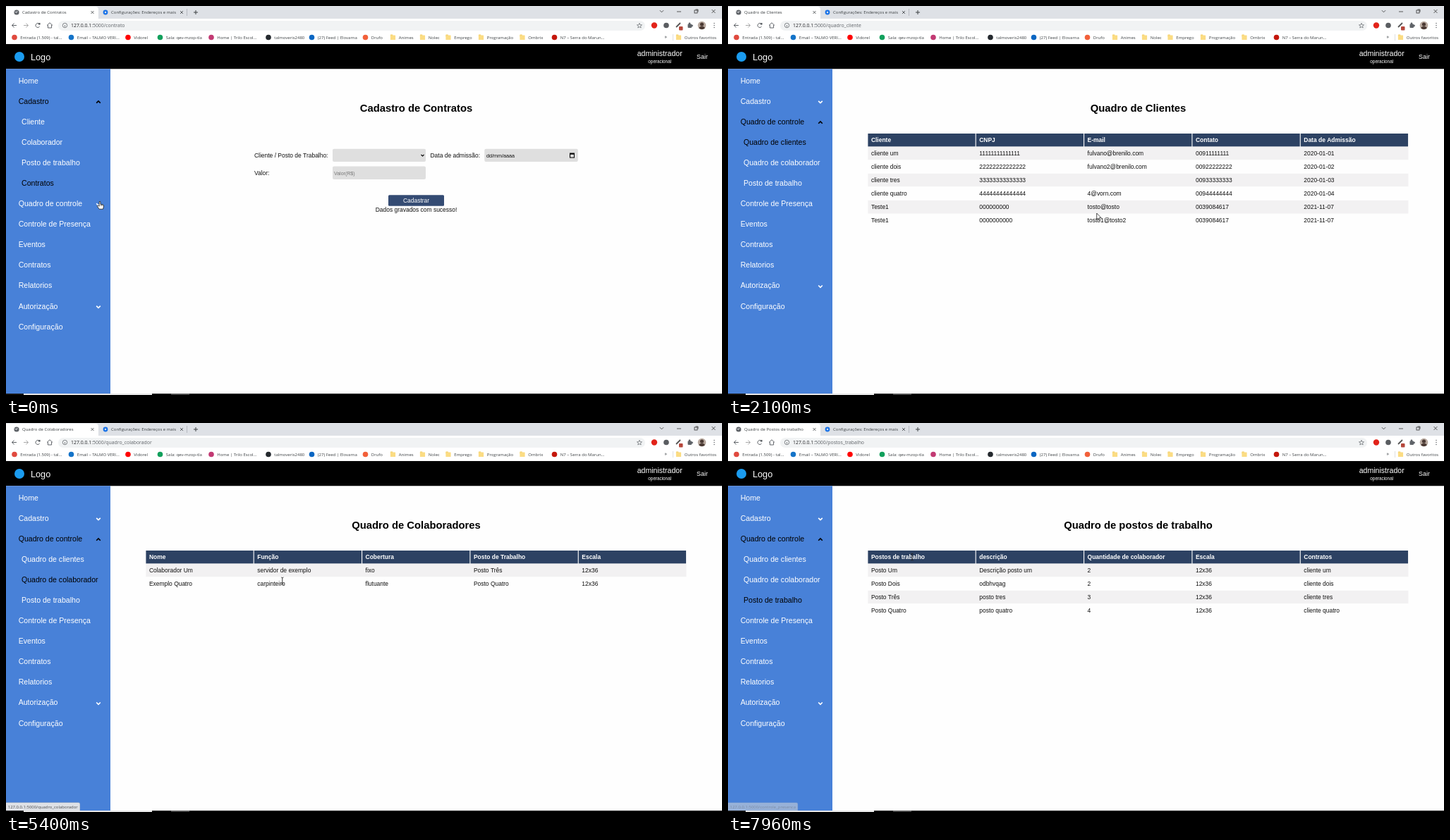
Recreate the animation shown at these times as an HTML page with a canvas. Size 1015x552 px, loop 8000 ms.

```html
<!DOCTYPE html>
<html lang="pt-BR">
<head>
<meta charset="utf-8">
<title>Painel</title>
<style>
html, body { margin: 0; width: 100%; height: 100%; overflow: hidden; background: #fff; }
canvas { display: block; width: 1015px; height: 552px; }
</style>
</head>
<body>
<canvas id="stage" width="1015" height="552"></canvas>
<script>
const ctx = document.getElementById('stage').getContext('2d');
const LOOP = 8000;
const PAGE = '"Liberation Sans", Arial, sans-serif';
const UI = '"Open Sans", sans-serif';
const HOST = '127.0.0.1';
const BODY = 8.46;

const MENU = [
  ['Home'],
  ['Cadastro', ['Cliente', 'Colaborador', 'Posto de trabalho', 'Contratos']],
  ['Quadro de controle', ['Quadro de clientes', 'Quadro de colaborador', 'Posto de trabalho']],
  ['Controle de Presença'], ['Eventos'], ['Contratos'], ['Relatorios'],
  ['Autorização', []], ['Configuração']
];

const PAGES = {
  contract: { title: 'Cadastro de Contratos', tab: 'Cadastro de Contratos', path: 'contrato', active: 'Contratos' },
  clients: {
    title: 'Quadro de Clientes', tab: 'Quadro de Clientes', path: 'quadro_cliente', active: 'Quadro de clientes',
    rows: [
      'Cliente|CNPJ|E-mail|Contato|Data de Admissão',
      'cliente um|11111111111111|fulvano@brenilo.com|00911111111|2020-01-01',
      'cliente dois|22222222222222|fulvano2@brenilo.com|00922222222|2020-01-02',
      'cliente tres|33333333333333||00933333333|2020-01-03',
      'cliente quatro|44444444444444|4@vorn.com|00944444444|2020-01-04',
      'Teste1|000000000|tosto@tosto|0039084617|2021-11-07',
      'Teste1|0000000000|tosto1@tosto2|0039084617|2021-11-07'
    ]
  },
  staff: {
    title: 'Quadro de Colaboradores', tab: 'Quadro de Colaboradores', path: 'quadro_colaborador', active: 'Quadro de colaborador',
    rows: [
      'Nome|Função|Cobertura|Posto de Trabalho|Escala',
      'Colaborador Um|servidor de exemplo|fixo|Posto Três|12x36',
      'Exemplo Quatro|carpinteiro|flutuante|Posto Quatro|12x36'
    ]
  },
  posts: {
    title: 'Quadro de postos de trabalho', tab: 'Quadro de Postos de trabalho', path: 'postos_trabalho', active: 'Posto de trabalho',
    rows: [
      'Postos de trabalho|descrição|Quantidade de colaborador|Escala|Contratos',
      'Posto Um|Descrição posto um|2|12x36|cliente um',
      'Posto Dois|odbhvqag|2|12x36|cliente dois',
      'Posto Três|posto tres|3|12x36|cliente tres',
      'Posto Quatro|posto quatro|4|12x36|cliente quatro'
    ]
  }
};

// Step tracks: the last entry whose time has passed applies.
const PAGE_TRACK = [[0, 'contract'], [810, 'clients'], [4900, 'staff'], [7470, 'posts']];
const PATH_TRACK = [[0, 'contrato'], [700, 'quadro_cliente'], [4860, 'quadro_colaborador'], [7430, 'postos_trabalho']];
const HOVER_TRACK = [
  [0, ''], [440, 'Quadro de clientes'], [810, 'Eventos'], [1080, ''], [3700, 'Controle de Presença'],
  [3900, 'Posto de trabalho'], [4120, 'Quadro de colaborador'], [4200, 'Quadro de clientes'],
  [4380, 'Quadro de colaborador'], [5260, ''], [6640, 'Posto de trabalho'], [7770, 'Controle de Presença'], [7830, '']
];
const CURSOR_TRACK = [
  [0, 'hand'], [700, 'arrow'], [810, 'hand'], [1080, 'arrow'], [3400, 'hand'], [5260, 'arrow'],
  [5370, 'beam'], [5440, 'arrow'], [6640, 'hand'], [7820, 'arrow'], [7930, 'beam']
];
const CURSOR_PATH = [
  [0, 133, 277], [100, 133, 277], [560, 77, 314], [900, 77, 314], [1500, 343, 312], [1530, 345, 312],
  [2100, 522, 294], [2330, 681, 298], [2360, 684, 299], [2460, 755, 314], [2660, 755, 314],
  [2830, 469, 334], [3200, 469, 334], [3500, 117, 316], [4000, 80, 238], [4250, 75, 197],
  [4530, 70, 218], [5200, 70, 218], [5400, 391, 224], [6000, 857, 228], [6030, 857, 228],
  [6760, 65, 254], [7700, 65, 254], [7800, 120, 276], [7880, 300, 230], [7960, 261, 190]
];
// Status bubble: start, end, fade-in, fade-out, path
const STATUS = [
  [500, 740, 60, 1, 'quadro_cliente'], [740, 1340, 1, 120, 'evento'],
  [4300, 5640, 80, 120, 'quadro_colaborador'], [6850, 7790, 45, 1, 'postos_trabalho'],
  [7790, 8000, 1, 60, 'controle_presenca']
];

const at = (track, t) => track.filter(k => k[0] <= t).pop()[1];

function cursorAt(t) {
  const i = CURSOR_PATH.findIndex(k => k[0] > t);
  if (i < 0) return CURSOR_PATH.at(-1).slice(1);
  const [t0, x0, y0] = CURSOR_PATH[i - 1], [t1, x1, y1] = CURSOR_PATH[i];
  const p = (t - t0) / (t1 - t0);
  return [x0 + (x1 - x0) * p, y0 + (y1 - y0) * p];
}

function box(x, y, w, h, color, r = 0) {
  ctx.fillStyle = color;
  ctx.beginPath();
  ctx.roundRect(x, y, w, h, r);
  ctx.fill();
}

function dot(x, y, r, color) {
  ctx.fillStyle = color;
  ctx.beginPath();
  ctx.arc(x, y, r, 0, 7);
  ctx.fill();
}

function line(points, color, width = 0.8) {
  ctx.strokeStyle = color;
  ctx.lineWidth = width;
  ctx.beginPath();
  points.forEach(([x, y]) => ctx.lineTo(x, y));
  ctx.stroke();
}

function ring(x, y, r, color, from = 0, to = 7, width = 0.8) {
  ctx.strokeStyle = color;
  ctx.lineWidth = width;
  ctx.beginPath();
  ctx.arc(x, y, r, from, to);
  ctx.stroke();
}

function cross(x, y, r, color, width) {
  line([[x - r, y - r], [x + r, y + r]], color, width);
  line([[x - r, y + r], [x + r, y - r]], color, width);
}

function chevron(x, y, w, h, color, width) {
  line([[x - w, y - h], [x, y + h], [x + w, y - h]], color, width);
}

function label(str, x, cy, size, color, { font = PAGE, weight = 400, align = 'left' } = {}) {
  ctx.font = `${weight} ${size}px ${font}`;
  ctx.textAlign = align;
  ctx.fillStyle = color;
  ctx.fillText(str, x, cy + size * 0.355);
  return ctx.measureText(str).width;
}

const ui = (str, x, y, color = '#3c4043', size = 6) => label(str, x, y, size, color, { font: UI });

function drawTabs(page, path, loading, t) {
  box(0, 0, 1015, 18, '#dee1e6');
  box(0, 1, 131, 18, '#fff', [0, 4, 0, 0]);
  if (loading) {
    const a = t / 160;
    ring(15, 9, 3.4, '#f3cfa8', a, a + 1.6);
  } else {
    dot(15, 9, 3.6, '#5f6368');
    line([[12.5, 8], [15, 9.5], [16, 7]], '#dfe1e5', 1);
  }
  ui(loading ? `${HOST}:5000/${path}` : page.tab, 23, 9);
  cross(122.5, 9, 2, '#3c4043');
  dot(141, 9, 3.4, '#1a73e8');
  dot(141, 9, 1.2, '#dee1e6');
  ui('Configurações: Endereços e mais', 149, 9);
  cross(249, 9, 2, '#3c4043');
  line([[256.5, 4], [256.5, 14]], '#9aa0a6', 0.6);
  line([[266, 9], [272, 9]], '#3c4043', 1);
  line([[269, 6], [269, 12]], '#3c4043', 1);
  chevron(929.5, 7.5, 2.6, 1.3, '#333');
  line([[951, 8], [957, 8]], '#333');
  ctx.strokeStyle = '#333';
  ctx.strokeRect(976, 6, 4, 4);
  line([[977.5, 5], [981, 5], [981, 8.5]], '#333');
  cross(1003, 7.5, 2.5, '#333');
}

function drawToolbar(path, loading) {
  const ink = '#5f6368';
  box(0, 18, 1015, 36, '#fff');
  box(74, 21, 832, 14, '#f1f3f4', 7);
  line([[15, 27.5], [8.5, 27.5]], ink, 1);
  line([[11.5, 24.5], [8.5, 27.5], [11.5, 30.5]], ink, 1);
  line([[25, 27.5], [31.5, 27.5]], '#aaa', 1);
  line([[28.5, 24.5], [31.5, 27.5], [28.5, 30.5]], '#aaa', 1);
  if (loading) cross(45, 27.5, 3, ink, 1);
  else {
    ring(45, 27.5, 3, ink, 0.5, 5.6, 1);
    box(46, 24, 2.6, 2.6, ink);
  }
  line([[58, 27.5], [62, 23.8], [66, 27.5]], ink, 1);
  line([[59.4, 27], [59.4, 31], [64.6, 31], [64.6, 27]], ink, 1);
  ring(83.5, 27.5, 3.2, ink);
  line([[83.5, 27], [83.5, 29.5]], ink);
  const w = ui(HOST, 92, 27.5, '#202124', 6.9);
  ui(`:5000/${path}`, 92 + w, 27.5, ink, 6.9);

  ctx.strokeStyle = ink;
  ctx.lineWidth = 0.7;
  ctx.beginPath();
  for (let i = 0; i < 10; i++) {
    const r = i % 2 ? 1.6 : 3.7, a = i * Math.PI / 5 - Math.PI / 2;
    ctx.lineTo(898 + r * Math.cos(a), 28 + r * Math.sin(a));
  }
  ctx.closePath();
  ctx.stroke();
  dot(919, 27.5, 4.2, '#e2231a');
  dot(936, 27.5, 3.8, '#5a5d61');
  line([[950, 30], [956, 24]], '#555', 1.8);
  box(954, 29, 5.5, 5.5, '#b5473c', 1);
  box(966.5, 25.5, 5.5, 5.5, ink, 1);
  dot(969, 25, 1.4, ink);
  dot(972.5, 28, 1.4, ink);
  ctx.save();
  ctx.beginPath();
  ctx.arc(986.5, 27.5, 5.8, 0, 7);
  ctx.clip();
  box(980, 21, 13, 13, '#b9aaa0');
  dot(986.5, 26, 2.6, '#4b3a34');
  dot(986.5, 33.5, 4.8, '#4b3a34');
  ctx.restore();
  [24.5, 27.5, 30.5].forEach(y => dot(1004, y, 0.75, ink));
}

function folder(x) {
  box(x - 3.6, 40.5, 3.5, 3, '#f2cf6b', 0.5);
  box(x - 3.6, 41.5, 7.2, 6.5, '#fbdc83', 0.6);
}

function drawBookmarks() {
  const marks = [
    [12, 'Entrada (1.509) - tal...', '#e04a3f'], [92.5, 'Email – TALMO VERI...', '#1473c8'],
    [173, 'Vidorel', '#f00'], [218.5, 'Sala: qev-mzop-tla', '#12a05c'],
    [291, 'Home | Trilo Escol...', '#c23a73'], [372, 'talmoveris2480', '#24292e'],
    [433.5, '(27) Feed | Elovarna', '#0a66c2'], [509.5, 'Drufo', '#f2603a'],
    [548.5, 'Animes'], [590.5, 'Nolec'], [627, 'Emprego'], [673.5, 'Programação'],
    [732, 'Ombrix'], [777.5, 'N7 – Serra do Marun...', '#c4170c'], [953.5, 'Outros favoritos']
  ];
  for (const [x, name, color] of marks) {
    if (color) dot(x, 44.5, 3.8, color);
    else folder(x);
    ui(name, x + 8.3, 44.5);
  }
  ui('»', 933.5, 44, '#3c4043', 7);
  line([[945.5, 40], [945.5, 49]], '#ccc', 0.6);
}

function drawHeader(right) {
  box(0, 54, 1015, 35.3, '#000');
  dot(19, 72, 7, '#1b9cf0');
  label('Logo', 35, 72, 12.69, '#fff');
  const mid = { align: 'center' };
  label('administrador', right - 88.3, 67, 10.57, '#fff', mid);
  label('operacional', right - 88.3, 79, 6.34, '#fff', mid);
  label('Sair', right - 28, 71.7, 8.9, '#fff', mid);
}

function drawMenu(page, open, hover) {
  box(0, 89.3, 148, 461, '#4881d8');
  let y = 106;
  const next = () => { y += 29.07; };
  for (const [name, subs] of MENU) {
    const isOpen = open.includes(name);
    label(name, 17.7, y, 10.57, isOpen || name === hover ? '#000' : '#fff');
    if (subs) chevron(131, y + 1.2, 2.8, isOpen ? -1.4 : 1.4, isOpen ? '#000' : '#fff', 1.6);
    next();
    if (!isOpen) continue;
    for (const sub of subs) {
      const dark = sub === page.active && name === open[0] || sub === hover && name === 'Quadro de controle';
      label(sub, 22, y, 10.57, dark ? '#000' : '#fff');
      next();
    }
  }
}

function drawForm(dx) {
  ctx.save();
  ctx.translate(dx, 0);
  const field = '#dfdfdf', ink = '#111';
  label('Cliente / Posto de Trabalho:', 352, 212, BODY, ink);
  label('Data de admissão:', 601.5, 212, BODY, ink);
  label('Valor:', 352, 237, BODY, ink);
  box(463, 202.7, 132, 18.4, field, 2);
  box(678.3, 202.7, 132.5, 18.4, field, 2);
  box(463, 227.5, 132, 18.4, field, 2);
  chevron(590.5, 212, 2, 1, '#000', 1.1);
  label('dd/mm/aaaa', 681, 212, 7.2, ink);
  ctx.strokeStyle = '#000';
  ctx.lineWidth = 1;
  ctx.strokeRect(799.5, 209.5, 6, 5.6);
  box(799, 208.5, 7, 2.2, '#000');
  label('Valor(R$)', 465, 237, 7.05, '#777');
  box(542, 268.3, 79, 15.4, '#344b73', 1.5);
  label('Cadastrar', 581.5, 276, BODY, '#fff', { align: 'center' });
  label('Dados gravados com sucesso!', 581.5, 288.5, BODY, ink, { align: 'center' });
  ctx.restore();
}

function drawTable(rows) {
  const left = 198.4, step = 153.35;
  rows.forEach((row, r) => {
    const cy = 190 + r * 19.05;
    if (r % 2) box(left, cy - 9.4, 766, 18.6, '#f2f1f2');
    row.split('|').forEach((cell, c) => {
      const x = left + c * step;
      if (!r) box(x, 181, step - 1.1, 18.4, '#2d4263');
      label(cell, x + 4.5, cy, BODY, r ? '#111' : '#fff', { weight: r ? 400 : 700 });
    });
  });
}

function drawScrollbar() {
  box(1006, 54, 9, 496, '#f1f1f1');
  box(1007, 63.5, 7, 465.5, '#c1c1c1');
  chevron(1010.5, 59, 1.8, -0.9, '#555', 1);
  chevron(1010.5, 545, 1.8, 0.9, '#555', 1);
}

function drawStatus(t) {
  for (const [start, end, rise, fall, path] of STATUS) {
    if (t < start || t >= end) continue;
    // The last bubble is already fading as the loop closes.
    const out = end === LOOP ? (t < 7900 ? 1 : Math.max(0, 1 - (t - 7900) / 95)) : (end - t) / fall;
    ctx.globalAlpha = Math.min(1, (t - start) / rise, out);
    const str = `${HOST}:5000/${path}`;
    ctx.font = `400 5.95px ${UI}`;
    const w = ctx.measureText(str).width + 6;
    box(0, 538.5, w, 12, '#b9bcc0', [0, 2, 0, 0]);
    box(0, 539, w - 0.5, 11.5, '#dee1e6', [0, 2, 0, 0]);
    ui(str, 2.8, 544.8, '#4a4d51', 5.95);
    ctx.globalAlpha = 1;
  }
}

function drawCursor(kind, x, y) {
  ctx.save();
  ctx.translate(x, y);
  ctx.lineJoin = 'round';
  if (kind === 'beam') {
    line([[-1.8, -5], [0, -4.5], [1.8, -5]], '#222', 0.7);
    line([[0, -4.7], [0, 4.7]], '#222', 0.9);
    line([[-1.8, 5], [0, 4.5], [1.8, 5]], '#222', 0.7);
  } else {
    const shape = kind === 'hand'
      ? 'M-.9 .8Q0-.4 .9 .8V4.2L4.6 5Q5.8 5.4 5.5 7L4.6 11.2H-.8L-3.6 7.2Q-3.6 5.6-2 6.3L-.9 7.2Z'
      : 'M0 0V9L2.1 7.1L3.5 10.3L5 9.6L3.6 6.6H6.4Z';
    const path = new Path2D(shape);
    ctx.fillStyle = '#fff';
    ctx.fill(path);
    ctx.strokeStyle = '#111';
    ctx.lineWidth = 0.75;
    ctx.stroke(path);
    if (kind === 'hand') [1, 2.6, 4].forEach(k => line([[k, 4.8], [k, 6.8]], '#111', 0.5));
  }
  ctx.restore();
}

function draw(t) {
  const page = PAGES[at(PAGE_TRACK, t)];
  const path = at(PATH_TRACK, t);
  const loading = path !== page.path;
  const form = !page.rows;
  const expanded = form && t >= 60;
  const right = expanded ? 1006.2 : 1015;
  const open = form ? ['Cadastro', ...(expanded ? ['Quadro de controle'] : [])] : ['Quadro de controle'];

  box(0, 0, 1015, 552, '#fefefe');
  drawTabs(page, path, loading, t);
  drawToolbar(path, loading);
  drawBookmarks();
  drawHeader(right);
  drawMenu(page, open, at(HOVER_TRACK, t));
  label(page.title, (148 + right) / 2, 145, 14.8, '#000', { weight: 700, align: 'center' });
  if (form) drawForm((right - 1015) / 2);
  else drawTable(page.rows);
  if (expanded) drawScrollbar();
  drawStatus(t);
  box(0, 550, 1015, 2, '#141414');
  box(25, 550, 182, 2, '#e4e4e4');
  box(234, 550, 26, 2, '#4a4a4a');
  drawCursor(at(CURSOR_TRACK, t), ...cursorAt(t));
}

const begin = performance.now();
function tick() {
  draw((performance.now() - begin) % LOOP);
  requestAnimationFrame(tick);
}
tick();
</script>
</body>
</html>
```
